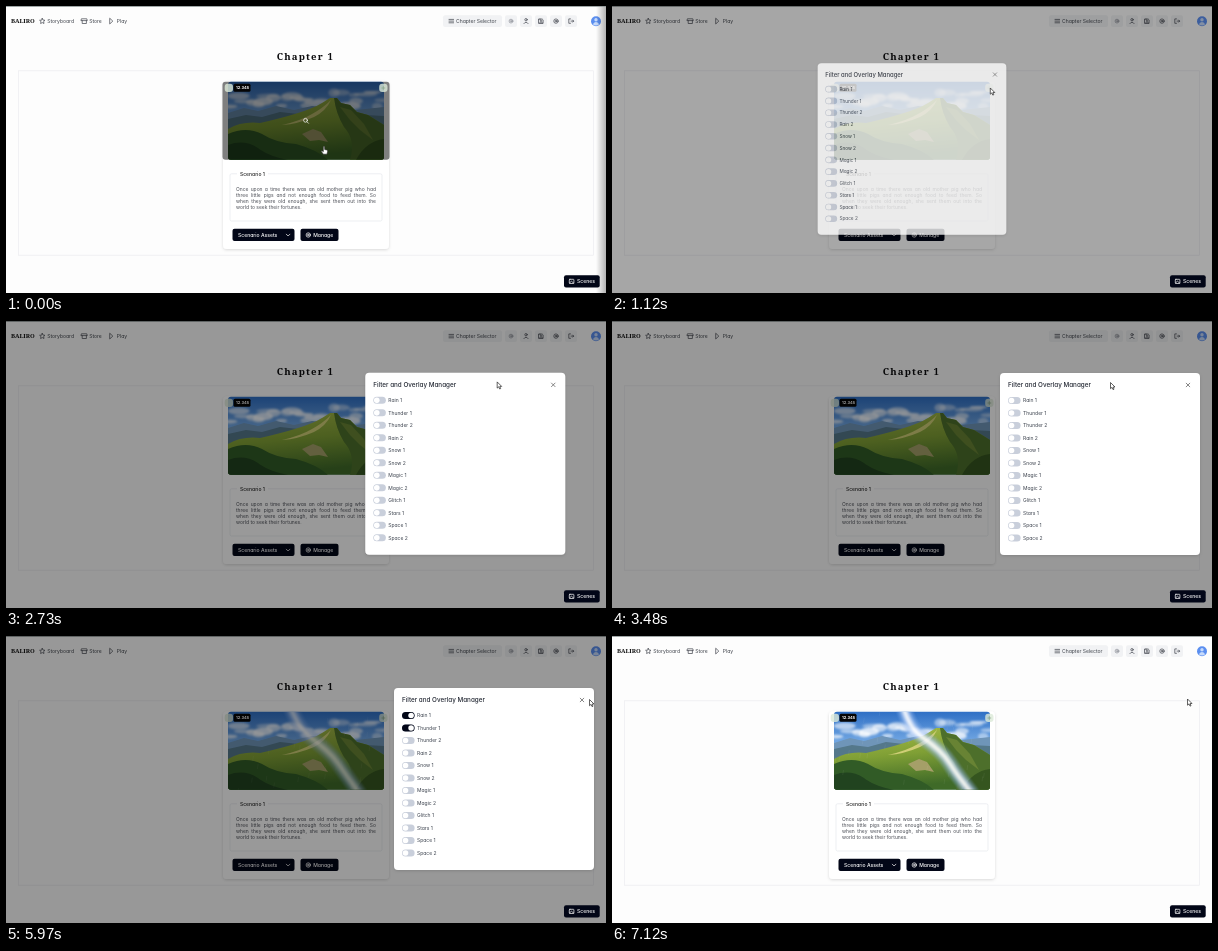
Write an HTML page that moves like this. It is 600 px wide and 287 px high and loops after 7.15 s.

```html
<!DOCTYPE html>
<html lang="en">
<head>
<meta charset="utf-8">
<title>Filter and Overlay Manager</title>
<style>
  html, body { margin: 0; width: 100%; height: 100%; overflow: hidden; background: #fdfdfd; }
  svg { display: block; width: 100vw; height: 100vh; }
  text, .story { font-family: Inter, "Open Sans", sans-serif; font-feature-settings: "cv11"; white-space: pre; }
  .slab { font-family: "Noto Serif", "DejaVu Serif", serif; }
  .story { font-size: 4.95px; line-height: 6.2px; color: #4a4d55; }
  .story div { text-align-last: justify; white-space: nowrap; }
  .story div:last-child { text-align-last: left; }
  .icon { fill: none; stroke-width: .7; stroke-linecap: round; stroke-linejoin: round; }
</style>
</head>
<body>
<svg id="stage" viewBox="0 0 600 287" preserveAspectRatio="none">
  <defs>
    <clipPath id="frame"><rect x="222" y="75.8" width="156" height="78" rx="3"/></clipPath>
    <linearGradient id="sky" x2="0" y2="1">
      <stop offset="0" stop-color="#2d6ec4"/><stop offset=".4" stop-color="#74a9e4"/><stop offset=".6" stop-color="#c3dbf0"/>
    </linearGradient>
    <linearGradient id="grass" x2=".25" y2="1">
      <stop offset="0" stop-color="#a9bd48"/><stop offset=".5" stop-color="#7f9f35"/><stop offset="1" stop-color="#3f6a28"/>
    </linearGradient>
    <linearGradient id="edge"><stop stop-color="#000" stop-opacity="0"/><stop offset="1" stop-color="#000" stop-opacity=".3"/></linearGradient>
    <filter id="soft" x="-30%" y="-30%" width="160%" height="160%"><feGaussianBlur stdDeviation="1.1"/></filter>
    <filter id="shade" x="-10%" y="-10%" width="120%" height="125%"><feDropShadow dx="0" dy="1" stdDeviation="1.5" flood-opacity=".14"/></filter>
  </defs>

  <rect width="600" height="287" fill="#fdfdfd"/>
  <g id="page">
    <rect x="12.5" y="64.8" width="575" height="184.4" fill="none" stroke="#ececef" stroke-width=".7"/>
    <rect x="217" y="75.5" width="166" height="167.5" rx="4" fill="#fff" filter="url(#shade)"/>
    <g clip-path="url(#frame)">
      <rect x="222" y="75" width="156" height="80" fill="url(#sky)"/>
      <g fill="#fff" filter="url(#soft)" id="clouds"></g>
      <path d="M222 107 L238 102 L252 105 L270 100 L288 104 L306 100 L330 102 L350 104 L378 101 V130 H222Z" fill="#6f95b8"/>
      <path d="M222 113 L240 109 L256 111 L274 106 L292 108 L310 103 L340 108 L378 110 V140 H222Z" fill="#54788a"/>
      <path d="M222 123 Q236 115 254 117 Q276 112 292 107 Q308 102 316 97 L324 92 L331 92 L335 97 L344 99 L351 106 L362 109 L378 119 V154 H222Z" fill="url(#grass)"/>
      <path d="M328 92 L331 92 L335 97 L344 99 L351 106 L362 109 L378 119 V154 H344 Q350 134 338 121 Q330 108 328 92Z" fill="#4d6f2b"/>
      <path d="M222 128 Q240 120 256 128 Q270 137 290 138 Q312 144 322 154 H222Z" fill="#315b26"/>
      <path d="M222 139 Q238 133 252 142 Q262 150 282 154 H222Z" fill="#21431f"/>
      <path d="M325 94 Q317 102 306 108 Q294 115 276 119 Q292 118 308 111 Q320 105 325 94Z" fill="#cfce76"/>
      <path d="M296 128 L307 123 L315 126 L322 136 L313 134 L304 135Z" fill="#a59f68"/>
      <path d="M334 101 L345 104 L358 118 L367 134 L354 124 L344 114Z" fill="#688334"/>
      <path d="M350 154 Q360 135 378 133 V154Z" fill="#35551f"/>
      <g id="rain" stroke="#fff" stroke-width=".35"></g>
      <g id="bolt" fill="none" stroke-linecap="round" stroke-linejoin="round" filter="url(#soft)">
        <path stroke="#8fb4ee" stroke-width="15" opacity=".4"/>
        <path stroke="#c6dafa" stroke-width="9" opacity=".65"/>
        <path stroke="#fff" stroke-width="4" opacity=".9"/>
      </g>
    </g>
    <g id="hover">
      <rect x="216.5" y="75.8" width="167" height="78" rx="3" opacity=".5"/>
      <g class="icon" stroke="#fff"><circle cx="299.5" cy="114.3" r="1.9"/><path d="M301 115.8l1.5 1.5"/></g>
    </g>
    <g fill="#dcead8" opacity=".8"><rect x="218.7" y="77.8" width="8.3" height="8.3" rx="3"/><rect x="373.2" y="77.8" width="8.3" height="8.3" rx="3"/></g>
    <path class="icon" stroke="#86a486" d="M375.8 82h3M377.3 80.5v3"/>
    <rect x="227.5" y="77.7" width="17" height="8" rx="1.5" fill="#050505"/>
    <path d="M231 167.8H225.5Q224 167.8 224 169.3V213.5Q224 215 225.5 215H374.5Q376 215 376 213.5V169.3Q376 167.8 374.5 167.8H262" fill="none" stroke="#e6e8ec" stroke-width=".7"/>
    <foreignObject x="230" y="179.8" width="140" height="30">
      <div xmlns="http://www.w3.org/1999/xhtml" class="story"><div>Once upon a time there was an old mother pig who had</div><div>three little pigs and not enough food to feed them. So</div><div>when they were old enough, she sent them out into the</div><div>world to seek their fortunes.</div></div>
    </foreignObject>
    <g fill="#020617"><rect x="226.5" y="222.8" width="62" height="12.2" rx="2"/><rect x="294.5" y="222.8" width="38" height="12.2" rx="2"/></g>
    <g class="icon" stroke="#fff">
      <path d="M280.3 228.2l1.8 1.8 1.8-1.8"/>
      <circle cx="302.3" cy="229" r="2.2"/><circle cx="302.3" cy="229" r=".8"/>
    </g>
    <g fill="#f1f2f4" id="tools"><rect x="437" y="9.3" width="59" height="11.6" rx="2"/></g>
    <g class="icon" stroke="#3f434b">
      <path d="M36.3 12.4l.8 1.7 1.9.2-1.4 1.3.4 1.9-1.7-.9-1.7.9.4-1.9-1.4-1.3 1.9-.2z"/>
      <path d="M75.8 12.8h5l.5 1.8h-6zM76.2 14.7v2.8h4.2v-2.8"/>
      <path d="M104 12.5l2.8 2.6-2.8 2.6z"/>
      <path d="M443 13.4h4.6M443 15.1h4.6M443 16.8h4.6"/>
      <g stroke="#8b8f97"><circle cx="505" cy="15.1" r="1.9"/><circle cx="505" cy="15.1" r=".6"/></g>
      <circle cx="520" cy="13.7" r="1.2"/><path d="M517.9 17.6q2.1-3 4.2 0"/>
      <path d="M532.9 13h3.3l.9.9v3.5h-4.2zM534 13v1.3h1.8M534 17.3v-1.5h2v1.5"/>
      <circle cx="550" cy="15.1" r="2.2"/><circle cx="550" cy="15.1" r=".8"/>
      <path d="M564.5 12.9h-1.7v4.4h1.7M565 15.1h2.6M566.6 14l1.1 1.1-1.1 1.1"/>
    </g>
    <circle cx="590" cy="15.2" r="5" fill="#5b8ff0"/>
    <circle cx="590" cy="13.7" r="1.7" fill="#c6dafb"/><path d="M586.8 18.3q3.2-4.6 6.4 0q-3.2 2.4-6.4 0z" fill="#c6dafb"/>
  </g>
  <rect id="side" x="590" width="10" height="287" fill="url(#edge)"/>
  <rect width="600" height=".8" fill="#8b9494"/>
  <rect id="veil" width="600" height="287"/>
  <g id="modal">
    <rect width="200" height="182" rx="4" fill="#fff" filter="url(#shade)"/>
    <path class="icon" stroke="#555" d="M186.2 10.2l3.6 3.6M189.8 10.2l-3.6 3.6"/>
  </g>
  <g id="top">
    <rect x="558" y="269.3" width="35.7" height="12.2" rx="2" fill="#020617"/>
    <g class="icon" stroke="#fff"><rect x="563.3" y="273.3" width="4.6" height="4.2" rx=".6"/><path d="M563.5 277l1.9-1.8 2.4 2"/></g>
  </g>
  <path id="arrow" d="M0 0V6.2L1.5 4.9 2.5 7.1 3.5 6.7 2.6 4.5H4.5Z" fill="#fff" stroke="#222" stroke-width=".7"/>
  <path id="hand" d="M-.7 .3Q0-.6 .7 .3V3L3 3.5Q3.8 3.8 3.6 5L3 7.7H-.7L-2.7 4.9Q-2.5 4-1.6 4.5L-.7 5.2Z" fill="#fff" stroke="#222" stroke-width=".6"/>
</svg>
<script>
const LOOP = 7150;
const $ = id => document.getElementById(id);

function add(parent, tag, attrs) {
  const node = document.createElementNS("http://www.w3.org/2000/svg", tag);
  for (const key in attrs) node.setAttribute(key, attrs[key]);
  return parent.appendChild(node);
}
// y is the middle of the line of text
function label(parent, str, x, y, size, fill, weight = 400, more = {}) {
  add(parent, "text", { x, y: y + size * .36, "font-size": size, fill, "font-weight": weight, ...more }).textContent = str;
}

const clamp = v => Math.max(0, Math.min(1, v));
const part = (t, from, length) => clamp((t - from) / length);
const easeOut = u => 1 - (1 - u) ** 3;
const smooth = u => u * u * (3 - 2 * u);

// rows are [time, x, y]
function follow(rows, t, ease) {
  let i = 0;
  while (i < rows.length - 2 && t >= rows[i + 1][0]) i++;
  const [a, b] = [rows[i], rows[i + 1]];
  const u = ease(part(t, a[0], b[0] - a[0]));
  return [1, 2].map(k => a[k] + (b[k] - a[k]) * u);
}

const page = $("page"), modal = $("modal");
label(page, "BALIRO", 5, 15.2, 6, "#111", 800, { class: "slab" });
label(page, "Storyboard", 41.2, 15.1, 5.05, "#3f434b");
label(page, "Store", 83.2, 15.1, 5.05, "#3f434b");
label(page, "Play", 110.8, 15.1, 5.05, "#3f434b");
label(page, "Chapter Selector", 450, 15.1, 5.05, "#3f434b");
label(page, "Chapter 1", 270.7, 51, 9.6, "#0c0c0e", 700, { class: "slab", "letter-spacing": 1.15 });
label(page, "12.34s", 230, 81.7, 4, "#fff", 700);
label(page, "Scenario 1", 234, 167.8, 5, "#222", 500);
label(page, "Scenario Assets", 232, 228.9, 5.05, "#fff", 500);
label(page, "Manage", 307.2, 228.9, 5.05, "#fff", 500);
label($("top"), "Scenes", 571, 275.4, 5.05, "#fff", 500);
label(modal, "Filter and Overlay Manager", 8, 12, 6.3, "#262b36", 500);

for (let x = 499; x < 560; x += 15) add($("tools"), "rect", { x, y: 9.3, width: 12, height: 11.6, rx: 2 });

const names = ["Rain 1", "Thunder 1", "Thunder 2", "Rain 2", "Snow 1", "Snow 2",
  "Magic 1", "Magic 2", "Glitch 1", "Stars 1", "Space 1", "Space 2"];
const toggles = names.map((name, i) => {
  const y = 27.5 + i * 12.5;
  const pill = { x: 8, y: y - 3.5, width: 12.6, height: 7, rx: 3.5 };
  add(modal, "rect", { ...pill, fill: "#c9cfdb" });
  const on = add(modal, "rect", { ...pill, fill: "#020617", opacity: 0 });
  const thumb = add(modal, "circle", { cx: 11.5, cy: y, r: 2.8, fill: "#fff" });
  label(modal, name, 23, y, 5, "#3a404c");
  return { on, thumb };
});

let seed = 7;
const rand = () => (seed = seed * 16807 % 2147483647) / 2147483647;

for (let i = 0; i < 26; i++) {
  add($("clouds"), "ellipse", {
    cx: 224 + i * 6 + rand() * 5, cy: 84 + rand() * 18,
    rx: 5 + rand() * 8, ry: 1.2 + rand() * 3, opacity: .35 + rand() * .45
  });
}
const drops = Array.from({ length: 36 }, () => ({
  x: 222 + rand() * 160, phase: rand(), line: add($("rain"), "path", { d: "M0 0l-.7 5" })
}));

const spine = [[286, 72], [290, 84], [300, 97], [315, 108], [328, 121], [338, 135], [355, 157]];
function boltPath(t) {
  const shift = 2 - 3 * Math.cos((t - 5970) / 1150 * Math.PI);
  const pts = spine.map(([x, y], i) => [x + shift + Math.sin(t / 160 + i * 1.9), y]);
  let d = "M" + pts[0];
  for (let i = 1; i < pts.length - 1; i++) {
    const [a, b] = [pts[i], pts[i + 1]];
    d += "Q" + a + " " + (a[0] + b[0]) / 2 + " " + (a[1] + b[1]) / 2;
  }
  return d + "L" + pts[pts.length - 1];
}

const pointer = [
  [0, 318, 140.5], [60, 318, 140.5], [680, 378, 82], [1480, 378.5, 82], [1900, 310, 61.5],
  [2150, 310, 61.5], [2270, 391.5, 58.5], [2560, 480, 60], [2860, 498.5, 61.5], [3490, 498.5, 61.5],
  [3620, 450, 71], [3820, 401, 77], [4400, 401, 77], [4700, 400, 91], [5060, 400, 91],
  [5740, 583.5, 63.5], [6000, 583.5, 63.5], [6250, 575.5, 63], [LOOP, 575.5, 63]
];
const drag = [
  [0, 200, 52], [2160, 200, 52], [2270, 232, 53.3], [2500, 315, 52], [2860, 384, 51.8], [3050, 388, 52], [LOOP, 388, 52]
];
const handTimes = [[0, 1010], [3740, 5120], [6110, 6620]];
const clicks = [3960, 4860];

function draw(t) {
  const shown = easeOut(part(t, 1020, 260)) * (1 - easeOut(part(t, 6560, 220)));
  $("veil").setAttribute("opacity", .4 * Math.min(1, shown * 1.12));
  $("side").setAttribute("opacity", 1 - part(t, 900, 150));
  $("hover").setAttribute("opacity", 1 - part(t, 880, 140));

  const [mx, my] = follow(drag, t, u => u);
  const scale = .75 + .25 * shown;
  modal.setAttribute("opacity", shown);
  modal.setAttribute("transform", `translate(${mx + 100} ${my + 91}) scale(${scale}) translate(-100 -91)`);

  clicks.forEach((time, i) => {
    const u = smooth(part(t, time, 150));
    toggles[i].on.setAttribute("opacity", u);
    toggles[i].thumb.setAttribute("transform", `translate(${5.6 * u} 0)`);
  });

  $("rain").setAttribute("opacity", .16 * part(t, 4000, 150));
  for (const { x, phase, line } of drops) {
    const fall = (phase + t / 450) % 1;
    line.setAttribute("transform", `translate(${x - fall * 11} ${70 + fall * 86})`);
  }
  const bolt = $("bolt"), d = boltPath(t);
  bolt.setAttribute("opacity", part(t, 4980, 120) * (.85 + .13 * Math.sin(t / 75)));
  for (const path of bolt.children) path.setAttribute("d", d);

  const [x, y] = follow(pointer, t, smooth);
  const isHand = handTimes.some(([from, to]) => t >= from && t < to);
  for (const [id, on] of [["hand", isHand], ["arrow", !isHand]]) {
    $(id).setAttribute("transform", `translate(${x} ${y})`);
    $(id).setAttribute("visibility", on ? "visible" : "hidden");
  }
}

const start = performance.now();
function tick() {
  draw((performance.now() - start) % LOOP);
  requestAnimationFrame(tick);
}
tick();
</script>
</body>
</html>
```
